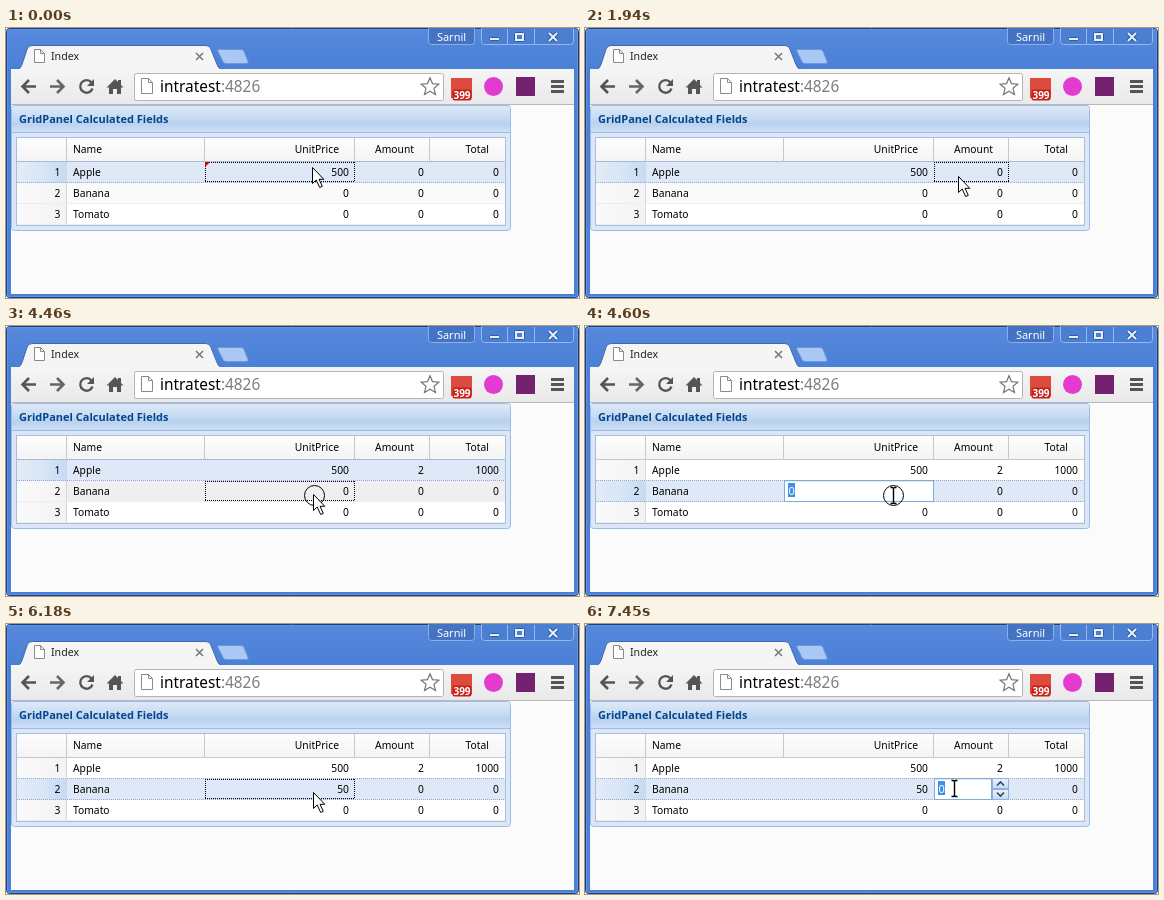
Write an HTML page with a canvas that moves like this. It is 573 px wide and 270 px high and loops after 8000 ms.

```html
<!DOCTYPE html>
<html lang="en">
<head>
<meta charset="utf-8">
<title>Calculated fields</title>
<style>
  html, body { margin: 0; width: 573px; height: 270px; overflow: hidden; background: #fff; }
  canvas { display: block; }
</style>
</head>
<body>
<canvas id="stage" width="573" height="270"></canvas>
<script>
const ctx = document.getElementById('stage').getContext('2d');
const LOOP = 8000;
const SANS = '"Noto Sans", "Open Sans", sans-serif';
const GRID_FONT = '10.3px ' + SANS;

// Every track lists [time, ...values]; a value holds until the next entry.
const pointer = [
  [0, 306, 139], [1120, 327, 152], [1250, 350, 163], [1400, 370, 152],
  [1550, 372, 150], [1670, 373, 148], [4070, 362, 151], [4220, 335, 160],
  [4340, 307, 168], [6710, 346, 168], [6860, 363, 161], [6990, 368, 163]
];
const clicking = [[0, false], [1670, true], [1940, false], [2060, true], [2210, false],
  [4460, true], [4730, false], [7140, true], [7450, false]];
const focus = [[0, 0, 'price'], [1820, 0, 'amount'], [4460, 1, 'price'], [7140, 1, 'amount']];
const editing = [[0, null], [2060, '0', true], [2920, '2'], [3200, null],
  [4600, '0', true], [5760, '5'], [5880, '50'], [6180, null], [7290, '0', true]];
const selectedRow = [[0, 0], [4600, 1]];
const hoverRow = [[0, 0], [1250, 1], [1550, 0], [4220, 1]];

const columns = { price: [199, 150], amount: [349, 75] };
const names = ['Apple', 'Banana', 'Tomato'];

function at(track, t) {
  let current = track[0];
  for (const entry of track) if (entry[0] <= t) current = entry;
  return current.slice(1);
}

function rect(x, y, w, h, fill) {
  ctx.fillStyle = fill;
  ctx.fillRect(x, y, w, h);
}

function outline(x, y, w, h, color) {
  ctx.strokeStyle = color;
  ctx.lineWidth = 1;
  ctx.strokeRect(x + .5, y + .5, w - 1, h - 1);
}

function dotted(d, color) {
  ctx.setLineDash([1, 1]);
  path(d, null, color);
  ctx.setLineDash([]);
}

function rounded(x, y, w, h, radius, fill, stroke) {
  ctx.beginPath();
  ctx.roundRect(x + .5, y + .5, w - 1, h - 1, radius);
  paint(fill, stroke, 1);
}

function path(d, fill, stroke, width = 1) {
  const shape = new Path2D(d);
  ctx.lineWidth = width;
  if (fill) { ctx.fillStyle = fill; ctx.fill(shape); }
  if (stroke) { ctx.strokeStyle = stroke; ctx.stroke(shape); }
}

function circle(x, y, r, fill, stroke) {
  ctx.beginPath();
  ctx.arc(x, y, r, 0, 2 * Math.PI);
  paint(fill, stroke, 1);
}

function paint(fill, stroke, width) {
  ctx.lineWidth = width;
  if (fill) { ctx.fillStyle = fill; ctx.fill(); }
  if (stroke) { ctx.strokeStyle = stroke; ctx.stroke(); }
}

function gradient(x0, y0, x1, y1, ...colors) {
  const g = ctx.createLinearGradient(x0, y0, x1, y1);
  colors.forEach((c, i) => g.addColorStop(i / (colors.length - 1), c));
  return g;
}

function text(str, x, y, { font = GRID_FONT, color = '#000', align = 'left' } = {}) {
  ctx.font = font;
  ctx.fillStyle = color;
  ctx.textAlign = align;
  ctx.fillText(str, x, y);
}

function pageIcon(x, y, w, h) {
  path(`M${x} ${y}h${w - 4}l4 4v${h - 4}h${-w}zM${x + w - 4} ${y}v4h4`, '#fff', '#8a8a8a');
}

function drawWindow() {
  ctx.clearRect(0, 0, 573, 270);
  rounded(0, 0, 573, 270, 3, gradient(0, 0, 0, 42, '#5789dc', '#4a80d6'), '#1d3f7c');
  rounded(1, 1, 571, 268, 2, null, '#5f92e3');

  rounded(422, -3, 47, 20, 3, '#4473c4', '#89aeea');
  text('Sarnil', 445.5, 13, { font: '11px ' + SANS, color: '#fff', align: 'center' });
  rounded(475, -3, 93, 20, 3, '#4b7fd2', '#96b8ee');
  rect(501, 1, 1, 15, '#96b8ee');
  rect(528, 1, 1, 15, '#96b8ee');
  rounded(483, 9, 11, 4, 1, '#e6effc', '#315a9e');
  rounded(508, 4, 11, 10, 1, '#e6effc', '#315a9e');
  rect(511, 7, 5, 4, '#4b7fd2');
  path('M543 5l8 8m0-8l-8 8', null, '#315a9e', 4);
  path('M543 5l8 8m0-8l-8 8', null, '#e6effc', 2);

  path('M213 21.5h22q2 0 3 2l4 10q1 2-2 2h-20q-2 0-3-2l-5-10q-1-2 1-2z', '#a9c8f5', '#7199d8');
  path('M11 41.5q4-1 5-5l5-15q1-4 5-4h174q4 0 5 4l6 15q1 4 5 5z', '#f5f5f5', '#4069ac');
  pageIcon(28.5, 21.5, 10, 13);
  text('Index', 45, 32, { font: '10.6px ' + SANS, color: '#222' });
  path('M190 25l7 7m0-7l-7 7', null, '#777', 1.5);

  rect(5, 41, 563, 36, gradient(0, 41, 0, 77, '#f5f5f5', '#e9e9e9'));
  rect(5, 76, 563, 1, '#b8b8b8');
  rect(5, 77, 563, 189, '#fbfbfb');
}

function drawToolbar() {
  path('M30 58.5h-13m6-6.5l-6.5 6.5 6.5 6.5', null, '#555', 2.6);
  path('M44 58.5h13m-6-6.5l6.5 6.5-6.5 6.5', null, '#666', 2.6);
  path('M85.5 54.5a6.3 6.3 0 1 0 1 6', null, '#555', 2.3);
  path('M88 51v7h-7z', '#555');
  path('M100.5 59.5l8.5-8.5 3 3v-2h3v5l2.5 2.5h-2.5v6.5h-4v-5h-4v5h-4v-6.5z', '#555');

  rounded(128, 45, 310, 28, 2, '#fff', '#b4b4b4');
  pageIcon(135.5, 50.5, 11, 15);
  const font = '15.4px ' + SANS;
  text('intratest', 154, 64, { font });
  const hostWidth = ctx.measureText('intratest').width;
  text(':4826', 154 + hostWidth, 64, { font, color: '#7d7d7d' });

  let star = '';
  for (let i = 0; i < 10; i++) {
    const r = i % 2 ? 4.2 : 9.3, a = Math.PI * (i / 5 - .5);
    star += `${i ? 'L' : 'M'}${424 + r * Math.cos(a)} ${59 + r * Math.sin(a)}`;
  }
  path(star + 'z', '#fff', '#777', 1.2);

  rect(445, 50, 21, 20, '#dc4b3e');
  rounded(446, 61, 20, 12, 2, '#c5221b');
  text('399', 456, 71, { font: 'bold 10px ' + SANS, color: '#fff', align: 'center' });
  circle(487.5, 58.5, 9.5, '#e33bd0');
  rect(510, 49, 19, 19, '#74226f');
  for (const y of [52, 57, 62]) rect(545, y, 13, 3, '#555');
}

function drawPanel() {
  rounded(5, 77, 500, 126, 3, '#dbe7f6', '#99bce8');
  rect(6, 79, 498, 25, gradient(0, 79, 0, 104, '#dce8f7', '#cbdef4', '#b9d2ef', '#cfe0f5'));
  rect(6, 104, 498, 1, '#99bce8');
  text('GridPanel Calculated Fields', 13, 95, { font: 'bold 11px ' + SANS, color: '#04468c' });

  rect(11, 109, 488, 89, '#fff');
  rect(11, 110, 488, 23, gradient(0, 110, 0, 133, '#fdfdfd', '#f4f4f4'));
  rect(11, 133, 488, 1, '#c8c8c8');
  for (const x of [60, 198, 348, 423]) rect(x, 110, 1, 23, '#c8c8c8');
  outline(10, 109, 490, 89, '#a9bfd9');
  text('Name', 67, 125);
  text('UnitPrice', 333, 125, { align: 'right' });
  text('Amount', 408, 125, { align: 'right' });
  text('Total', 483, 125, { align: 'right' });
}

function drawRow(row, t) {
  const y = 134 + 21 * row;
  const selected = at(selectedRow, t)[0] === row;
  const hovered = at(hoverRow, t)[0] === row;
  const price = row === 0 ? 500 : row === 1 && t >= 6180 ? 50 : 0;
  const amount = row === 0 && t >= 3200 ? 2 : 0;

  rect(11, y, 488, 21, selected ? '#dfe8f6' : hovered ? '#efefef' : row === 1 ? '#fafafa' : '#fff');
  rect(11, y, 49, 21, selected
    ? gradient(11, 0, 60, 0, '#e3ebf6', '#d9e6f6', '#c4dbf5')
    : gradient(11, 0, 60, 0, '#fafafa', '#f3f3f3'));
  rect(60, y, 1, 21, '#d4d8de');
  if (selected) {
    dotted(`M11 ${y - .5}h488M11 ${y + 20.5}h488`, '#8fabd8');
  } else {
    rect(11, y + 20, 488, 1, '#ededed');
  }

  const base = y + 14;
  text(row + 1, 54.5, base, { align: 'right' });
  text(names[row], 67, base);
  text(price, 343, base, { align: 'right' });
  text(amount, 418, base, { align: 'right' });
  text(price * amount, 493, base, { align: 'right' });
}

function drawEditor(x, y, w, value, allSelected, hasSpinner) {
  const fieldWidth = hasSpinner ? w - 17 : w;
  rect(x, y, w, 22, '#fff');
  rect(x, y + 1, fieldWidth, 1, '#e6e6e6');
  outline(x, y, fieldWidth, 22, '#7fabdc');
  if (hasSpinner) {
    for (const top of [y, y + 11]) {
      rect(x + w - 17, top, 17, 11, gradient(0, top, 0, top + 11, '#eaf3fd', '#c3daf3'));
      outline(x + w - 17, top, 17, 11, '#8db2df');
    }
    const cx = x + w - 8.5;
    path(`M${cx - 3.5} ${y + 7.5}l3.5-3.5 3.5 3.5M${cx - 3.5} ${y + 14.5}l3.5 3.5 3.5-3.5`, null, '#33475f', 1.6);
  }
  if (allSelected) rect(x + 4, y + 3, 7, 14, '#3b92ea');
  text(value, x + 4.5, y + 15, { font: '11px ' + SANS, color: allSelected ? '#fff' : '#000' });
  if (!allSelected) rect(Math.round(x + 5 + ctx.measureText(value).width), y + 3, 1, 14, '#000');
}

function drawFocus(x, y, w, h) {
  dotted(`M${x} ${y + .5}h${w}M${x} ${y + h - .5}h${w}` +
    `M${x + .5} ${y}v${h}M${x + w - .5} ${y}v${h}`, '#000');
}

function drawPointer(t, overField) {
  const [x, y] = at(pointer, t);
  if (at(clicking, t)[0]) circle(x + 1.5, y + 1.5, 10, null, '#000');
  ctx.save();
  ctx.translate(x, y);
  if (overField) {
    path('M-1.5-6.5h2l1 1 1-1h2M1.5-6v15M-1.5 9.5h2l1-1 1 1h2', null, '#000', 1.4);
  } else {
    path('M.5 .5v16l3.7-3.5 3.5 7.5 2.6-1.2-3.3-7h4.8z', '#fff', '#000');
  }
  ctx.restore();
}

function draw() {
  const t = performance.now() % LOOP;
  const [row, column] = at(focus, t);
  const [value, allSelected] = at(editing, t);
  const [x, w] = columns[column];
  const y = 134 + 21 * row;

  drawWindow();
  drawToolbar();
  drawPanel();
  // The selected row goes last so that its border covers the row above.
  const selected = at(selectedRow, t)[0];
  for (const r of [0, 1, 2]) if (r !== selected) drawRow(r, t);
  drawRow(selected, t);

  if (value !== null) {
    drawEditor(x, y - 1, w, value, allSelected, column === 'amount');
  } else {
    drawFocus(x, y, w, 20);
    if (t < 130) path('M199 134h5l-5 5z', '#d00000');
  }
  drawPointer(t, value !== null);
  requestAnimationFrame(draw);
}
draw();
</script>
</body>
</html>
```
